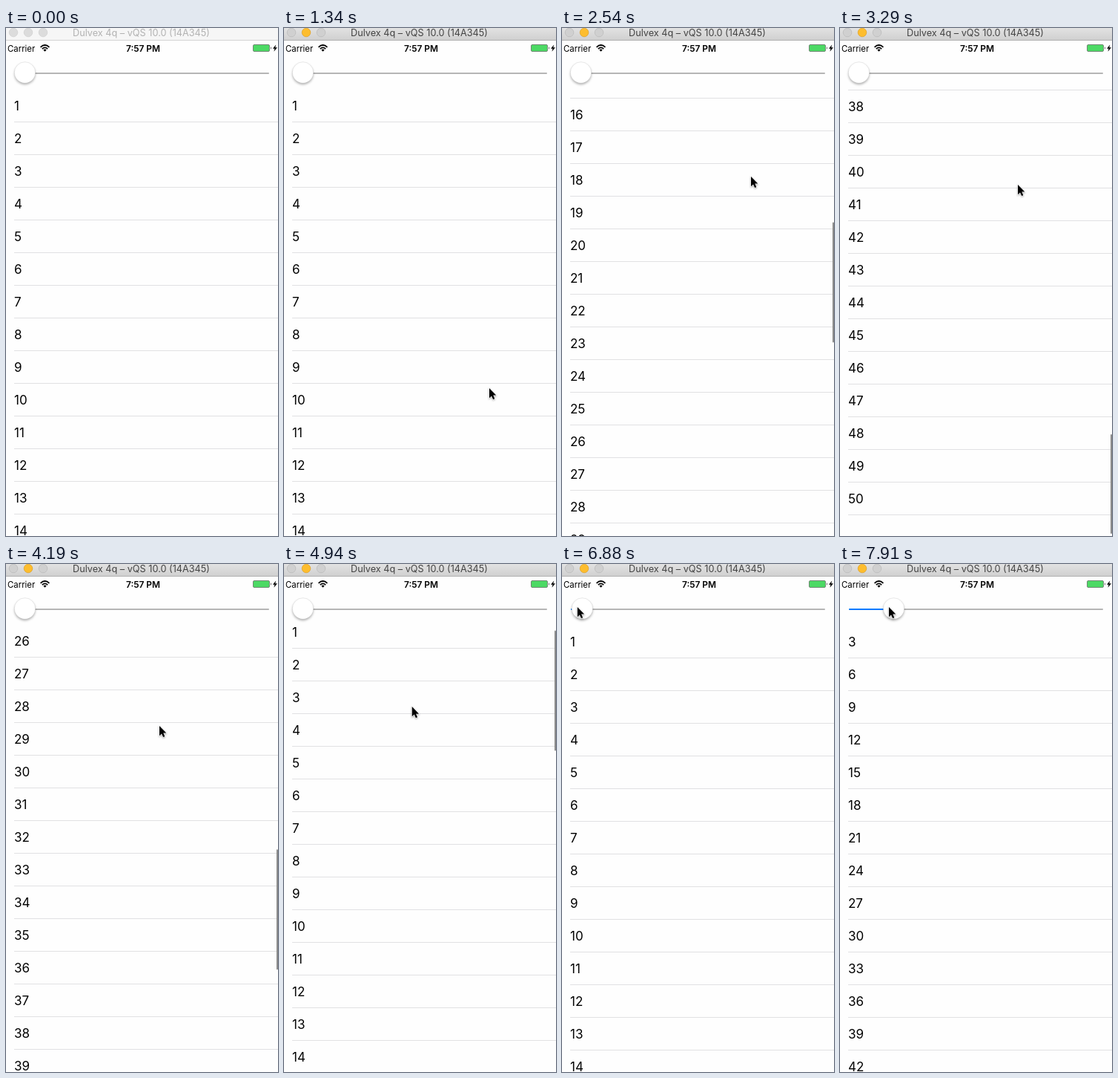
These frames come from a looping animation (367x684 px, 8000 ms). An HTML page:

```html
<!DOCTYPE html>
<html lang="en">
<head>
<meta charset="utf-8">
<title>Times tables</title>
<style>
  html, body { margin: 0; width: 100%; height: 100%; overflow: hidden; background: #fefefe; }
  svg { display: block; width: 367px; height: 684px; font-family: Inter, Roboto, sans-serif; }
  #rows text { font-size: 17px; }
  #rows rect { fill: #e1e1e3; }
  #title { font-size: 12.7px; fill: #b2b2b2; text-anchor: middle; }
  #bar { fill: #f6f6f6; }
  #edge { fill: #d3d3d3; }
  #lights circle { fill: #dcdcdc; stroke: #d0d0d0; stroke-width: .7; }
  .active #title { fill: #434343; }
  .active #bar { fill: url(#metal); }
  .active #edge { fill: #b1b1b1; }
  .active #lights circle { fill: #d0d0d0; stroke: #b9b9b9; }
  .active #lights circle:nth-child(2) { fill: #fdbd2e; stroke: #dfa023; }
  #thumb { filter: drop-shadow(0 2.5px 1.5px rgba(0, 0, 0, .28)); }
  #cursor { filter: drop-shadow(0 1px 1px rgba(0, 0, 0, .35)); }
</style>
</head>
<body>
<svg id="stage" viewBox="0 0 367 684">
  <defs>
    <linearGradient id="metal" x2="0" y2="1">
      <stop stop-color="#e2e2e2"/><stop offset="1" stop-color="#d0d0d0"/>
    </linearGradient>
    <clipPath id="table"><rect y="83" width="367" height="601"/></clipPath>
  </defs>
  <rect width="367" height="684" fill="#fefefe"/>

  <rect id="bar" width="367" height="16"/>
  <rect id="edge" y="16" width="367" height="1"/>
  <g id="lights">
    <circle cx="10" cy="6" r="5.8"/><circle cx="30" cy="6" r="5.8"/><circle cx="50" cy="6" r="5.8"/>
  </g>
  <text id="title" x="182.5" y="11">Dulvex 4q – vQS 10.0 (14A345)</text>

  <text x="2" y="31.5" font-size="11.4">Carrier</text>
  <g fill="none" stroke="#000" stroke-width="1.8">
    <path d="M46.6 25.8Q52.5 20.3 58.4 25.8M48.8 28.1Q52.5 24.7 56.2 28.1"/>
    <path d="M50.4 29.6Q52.5 27.6 54.6 29.6L52.5 31.8Z" fill="#000" stroke="none"/>
  </g>
  <text x="185" y="31.5" font-size="11.9" font-weight="600" text-anchor="middle">7:57 PM</text>
  <rect x="333.5" y="22.5" width="22" height="9" rx="1.5" fill="#4cd964" stroke="#6b7d6e" stroke-width=".9"/>
  <path d="M357 25Q358.5 27 357 29Z"/>
  <path d="M364.2 22.5L360 27.7H362.5L361.5 31.8L366 26.2H363.3Z"/>

  <rect x="12" y="60" width="343" height="2" rx="1" fill="#b5b5b5"/>
  <rect id="fill" x="12" y="60" width="14" height="2" rx="1" fill="#007aff"/>
  <circle id="thumb" cy="60" r="14.2" fill="#fff" stroke="#000" stroke-opacity=".15" stroke-width=".6"/>

  <g clip-path="url(#table)"><g id="rows"></g></g>
  <rect id="scroller" x="365" width="2" rx="1" fill="#8c8c8c"/>
  <path id="cursor" d="M0 0V13.2L3 10.4L5.1 15.1L7.3 14.2L5.3 9.6H9.3Z"
        stroke="#fff" stroke-width="1.1" paint-order="stroke"/>
</svg>
<script>
const LOOP = 8000, FIRST = 300, LAST = 7910, ACTIVATE = 750;
const ROWS = 50, PITCH = 44, TOP = 83, VIEW = 601;
const MAX_SCROLL = ROWS * PITCH - VIEW;
const GLIDE = 500, BOUNCE = 28.8, BOUNCE_PEAK = 120;
const THUMB_START = 25.5, GRAB_SLIDER = 6730, GRIP = 6.5;

const beats = [[FIRST, 1340, 7], [1340, 5680, 29], [5680, LAST, 15]];

// Where the pointer turns or rests: [time, x, y]
const pointer = [[300, 356, 440], [1340, 277, 485], [2090, 271, 490], [2540, 255, 200],
  [3290, 240, 211], [3890, 214, 104], [4190, 207, 218], [5090, 170, 190],
  [5680, 45, 74], [6580, 19, 58], [GRAB_SLIDER, 19, 58], [LAST, 66, 58]];

const $ = id => document.getElementById(id);
const set = (el, attrs) => Object.entries(attrs).forEach(([k, v]) => el.setAttribute(k, v));
const clamp = (v, lo = 0, hi = 1) => Math.min(Math.max(v, lo), hi);
const progress = (t, from, to) => clamp((t - from) / (to - from));
const smooth = u => u * u * (3 - 2 * u);

// Holds each picture until the next 10 ms-aligned capture.
function snap(t) {
  if (t < FIRST) return 0;
  let shown = FIRST;
  for (const [from, to, steps] of beats) {
    for (let i = 1; i <= steps; i++) {
      const time = Math.ceil((from + (to - from) * i / steps) / 10 - 1e-6) * 10;
      if (time > t) return shown;
      shown = time;
    }
  }
  return shown;
}

function pointerAt(t) {
  const i = clamp(pointer.findLastIndex(key => key[0] <= t), 0, pointer.length - 2);
  const [from, x, y] = pointer[i], [to, nextX, nextY] = pointer[i + 1];
  const u = smooth(progress(t, from, to));
  return [x + (nextX - x) * u, y + (nextY - y) * u];
}

// Accelerating drag, decaying glide, then a soft bounce past the edge.
function flick(t, { grab, release, from, dragged, reach, edge }) {
  const thrown = from + dragged;
  if (t < release) return from + dragged * progress(t, grab, release) ** 2;
  const hit = release - GLIDE * Math.log(1 - (edge - thrown) / reach);
  if (t < hit) return thrown + reach * (1 - Math.exp((release - t) / GLIDE));
  const x = (t - hit) / BOUNCE_PEAK;
  return edge + Math.sign(reach) * BOUNCE * x * Math.exp(1 - x);
}

const down = { grab: 2090, release: 2540, from: 0, dragged: 648, reach: 1360, edge: MAX_SCROLL };
const back = { grab: 3890, release: 4190, from: MAX_SCROLL, dragged: -498, reach: -1400, edge: 0 };

const labels = Array.from({ length: ROWS }, (_, i) => {
  const add = (tag, attrs) => {
    const el = document.createElementNS($("stage").namespaceURI, tag);
    set(el, attrs);
    return $("rows").appendChild(el);
  };
  const y = TOP + i * PITCH;
  add("rect", { x: 11, y: y + PITCH - 1, width: 356, height: 1 });
  return add("text", { x: 11, y: y + 27.5 });
});

let shownFactor = 0;
function showFactor(factor) {
  if (factor === shownFactor) return;
  shownFactor = factor;
  labels.forEach((label, i) => label.textContent = (i + 1) * factor);
}

function draw(t) {
  const [x, y] = pointerAt(t);
  $("stage").classList.toggle("active", t >= ACTIVATE);
  set($("cursor"), {
    transform: `translate(${x} ${y})`,
    visibility: t < FIRST ? "hidden" : "visible"
  });

  const scroll = Math.round(flick(t, t < back.grab ? down : back));
  set($("rows"), { transform: `translate(0 ${-scroll})` });

  const inside = clamp(scroll, 0, MAX_SCROLL), over = scroll - inside;
  set($("scroller"), {
    y: TOP + 3 + inside / MAX_SCROLL * 433 + Math.max(over, 0),
    height: 162 - Math.abs(over),
    opacity: progress(t, down.grab, 2240) - progress(t, 5830, 6130)
  });

  const thumb = t < GRAB_SLIDER ? THUMB_START : x + GRIP;
  set($("thumb"), { cx: thumb });
  set($("fill"), { width: thumb - 12 });
  showFactor(Math.floor(1 + (thumb - THUMB_START) / 315 * 19));
}

const start = performance.now();
function tick() {
  draw(snap((performance.now() - start) % LOOP));
  requestAnimationFrame(tick);
}
tick();
</script>
</body>
</html>
```
